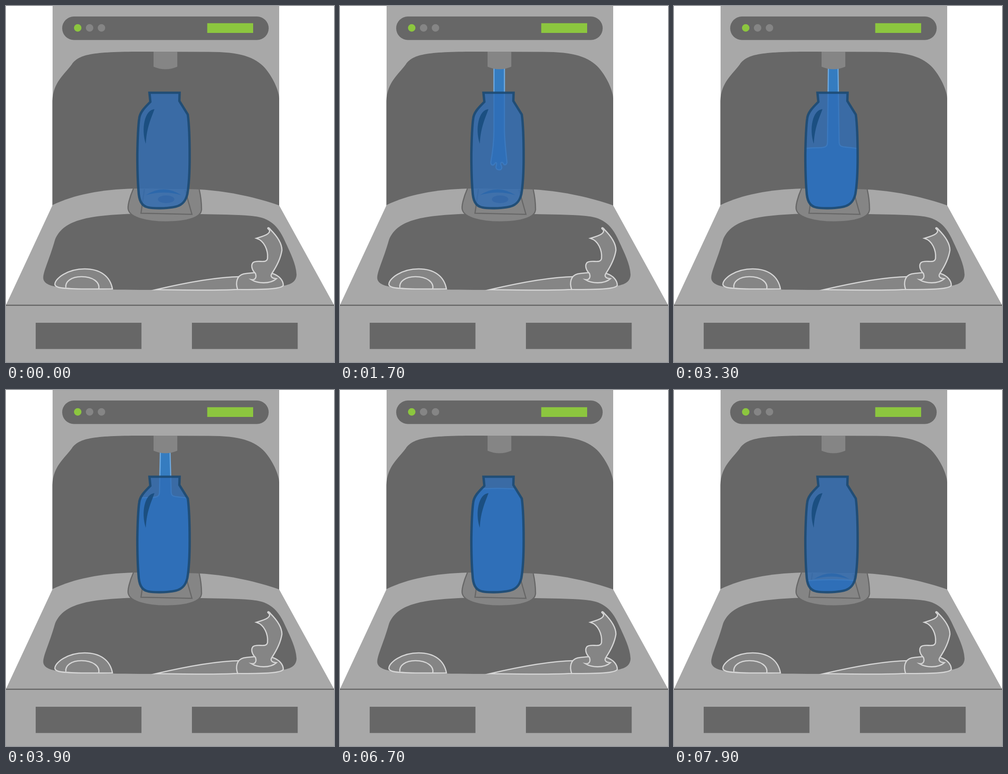
An HTML page with a canvas for the animation above (8 s loop, 718x780 px).

```html
<!DOCTYPE html>
<html lang="en">
<head>
<meta charset="utf-8">
<title>Bottle filler</title>
<style>
html, body { margin: 0; width: 100%; height: 100%; overflow: hidden; background: #fff; }
canvas { display: block; }
</style>
</head>
<body>
<canvas id="stage" width="718" height="780"></canvas>
<script>
const ctx = document.getElementById('stage').getContext('2d');
const LIGHT = '#a8a8a8', MID = '#858585', DARK = '#676767', LINE = '#d6d6d6', GREEN = '#8cc63f';
const WATER = '#357cc0', WATER_EDGE = '#6faae0';
const LOOP = 8000, STEP = 200, SPOUT_Y = 132;

function shape(d, fill, stroke, width = 2.6) {
  const path = d instanceof Path2D ? d : new Path2D(d);
  if (fill) { ctx.fillStyle = fill; ctx.fill(path); }
  if (stroke) { ctx.strokeStyle = stroke; ctx.lineWidth = width; ctx.stroke(path); }
}

function rect(x, y, w, h, fill) {
  ctx.fillStyle = fill;
  ctx.fillRect(x, y, w, h);
}

function ellipse(x, y, rx, ry, fill) {
  ctx.beginPath();
  ctx.ellipse(x, y, rx, ry, 0, 0, Math.PI * 2);
  ctx.fillStyle = fill;
  ctx.fill();
}

const bottle = new Path2D(`M314 190 L380 190 L379.5 208 L398 238 C401 260 402 300 402 330
  C402 370 400 395 397 412 C393 430 383 439 365 441 C350 443.5 325 444 312 441.5
  C296 439 291 425 290 405 C288 380 287.5 350 287.5 325 C288 295 289 265 291.5 247
  C293 233 303 223 316 210 Z`);
const waterArea = new Path2D(bottle);
waterArea.rect(320, 130, 56, 62);

function drawStation() {
  rect(0, 0, 718, 780, '#fff');
  rect(102, 0, 496, 440, LIGHT);
  const panel = new Path2D();
  panel.roundRect(123, 23, 452, 51.5, 25.7);
  shape(panel, DARK);
  [GREEN, MID, MID].forEach((c, i) => ellipse(157 + 26 * i, 48, 8.2, 8.2, c));
  rect(440.5, 37.7, 100.5, 21.3, GREEN);

  shape(`M101.5 437 V208 C103 167 128 150 144 128 C160 104 196 100 305 100 L440 100.5
    C510 100 545 111 567 136 C588 161 598 190 598 202 V438 Z`, DARK);
  shape(`M102 436 C150 413 208 402 280 400 L424 402 C490 406 550 420 598 437
    L718 655 H0 Z`, LIGHT);
  rect(0, 655, 718, 125, LIGHT);
  rect(0, 654.4, 718, 2.6, DARK);
  rect(65, 694, 231.5, 57.5, DARK);
  rect(407, 694, 231.5, 57.5, DARK);
}

function drawBasin() {
  shape(`M273 455.5 C175 459 124 470 107 513 C95 555 83 578 81.5 594 C81 606 92 612 110 615
    C150 621 230 622 330 622 L505 622 C560 622 585 618 607 613 C625 610 636 603 636 588
    C635 565 622 540 611 516 C593 474 570 463 538 460 C500 456.5 460 457 428 456 Z`, DARK);
  shape(`M233 620 C228 592 206 576 172 576 C135 576 107 597 107 610
    C108 618 125 619 165 620 Z`, MID, LINE);
  shape('M131 617 C129 604 143 593 165 593 C190 593 206 605 203 620', null, LINE);
  shape('M328 621.5 C390 607 460 594 512 593 L507 621 C450 624 390 622 328 621.5 Z', MID, LINE);
  shape(`M507 621 C502 606 505 591 520 587 C535 584 565 583 583 586
    C599 591 607 602 607 612 C604 619 575 622 507 621 Z`, MID, LINE);
  shape(`M573 487 C574 484 577 487 579 490 C592 503 604 518 604 535 C601 555 590 574 582 586
    C577 594 584 597 592 597.5 C578 610 550 608 537 599.5 C546 601 549 594 546 586
    C537 577 536 567 541 562 C551 555 570 566 572.5 553 C574 536 566 514 548 509
    C560 505 578 501 577 492 C576 489 573 489 573 487 Z`, MID, LINE);
}

function drawPedestal() {
  shape(`M279 400 C271 418 265 440 268 447 C273 464 310 473 350 473
    C395 473 427 464 428 446 C428 433 426 415 423 402`, MID, DARK);
  shape('M303 401 L295.5 454 L407 456.5 L392 403', null, DARK);
  shape('M306 414.5 Q345 389 384 414.5 Q345 403 306 414.5 Z', '#2f5c86');
  ellipse(350.5, 423.5, 18, 8.5, '#505c70');
}

// Falling front of the stream, with three drips at its tip.
function fallingStream(tip) {
  const a = tip - 16, top = Math.max(SPOUT_Y, tip - 88);
  return `M337 ${SPOUT_Y} V${top} C337 ${top + 30} 334 ${a - 22} 330 ${a}
    C331 ${a + 7} 336 ${a + 7} 339 ${a + 2} C341 ${a - 2} 344 ${a} 342 ${a + 7}
    C340 ${a + 13} 344 ${tip} 349 ${tip} C354 ${tip} 356 ${a + 10} 352 ${a + 5}
    C351 ${a - 2} 356 ${a - 2} 358 ${a + 3} C360 ${a + 6} 364 ${a + 6} 365.5 ${a}
    C364 ${a - 18} 360 ${top + 25} 360 ${top} V${SPOUT_Y} Z`;
}

// First splash spreading sideways over the bottle floor.
function splash(s) {
  const x = dx => 349 + dx * s;
  return `M338 ${SPOUT_Y} L336 388 C336 396 ${x(-24)} 394 ${x(-58)} 401
    C${x(-50)} 412 ${x(-37)} 413 ${x(-27)} 420 C${x(-16)} 426 ${x(-8)} 420 ${x(3)} 421
    C${x(10)} 421 ${x(12)} 417 ${x(18)} 419 C${x(26)} 424 ${x(44)} 420 ${x(49)} 412
    C${x(46)} 403 ${x(36)} 406 ${x(29)} 401 C${x(22)} 396 362 398 361.5 388
    L359 ${SPOUT_Y} Z`;
}

function filledTo(y, streamTop) {
  const sides = 'L412 455 L278 455 Z';
  if (streamTop === null) return `M278 ${y + 3} Q345 ${y - 4} 412 ${y + 3} ${sides}`;
  const bend = Math.max(y - 13, streamTop);
  return `M278 ${y + 2} C300 ${y - 1} 318 ${y} 325 ${y - 1} C334 ${y - 2} 336 ${y - 6} 336 ${bend}
    L338 ${streamTop} H359 L361.5 ${bend} C362 ${y - 5} 364 ${y - 3} 375 ${y - 2}
    C388 ${y} 396 ${y - 1} 412 ${y + 4} ${sides}`;
}

function waterPath(t) {
  if (t < 500) return null;
  if (t >= 6700) {
    const j = Math.floor((t - 6700) / STEP);
    return filledTo(Math.min(216 + 36 * j, 416), null);
  }
  const k = Math.floor((t - 500) / STEP);
  if (k <= 8) return fallingStream(155 + 34 * k);
  if (k <= 10) return splash(k === 9 ? 0.6 : 1);
  if (k <= 17) return filledTo(311 - 25 * (k - 14), SPOUT_Y);
  // The last of the stream drops into the neck.
  if (k === 18) return filledTo(222, SPOUT_Y);
  if (k === 19) return filledTo(213, 160);
  if (k === 20) return filledTo(209, 190);
  return filledTo(208, null);
}

function drawWater(t) {
  const d = waterPath(t);
  if (!d) return;
  ctx.save();
  ctx.clip(waterArea);
  shape(d, WATER, WATER_EDGE, 2.5);
  ctx.restore();
}

function drawBottle() {
  shape('M323 100 H375 V133 Q349 144 323 133 Z', MID);
  shape(bottle, 'rgba(45,108,182,0.78)', 'rgba(28,75,116,0.9)', 5.2);
  shape('M325 226 C304 227 295 268 306 302 C308 265 318 246 325 226 Z', '#1b4f81');
}

function frame() {
  const t = performance.now() % LOOP;
  drawStation();
  drawBasin();
  drawPedestal();
  drawWater(t);
  drawBottle();
  requestAnimationFrame(frame);
}
frame();
</script>
</body>
</html>
```
